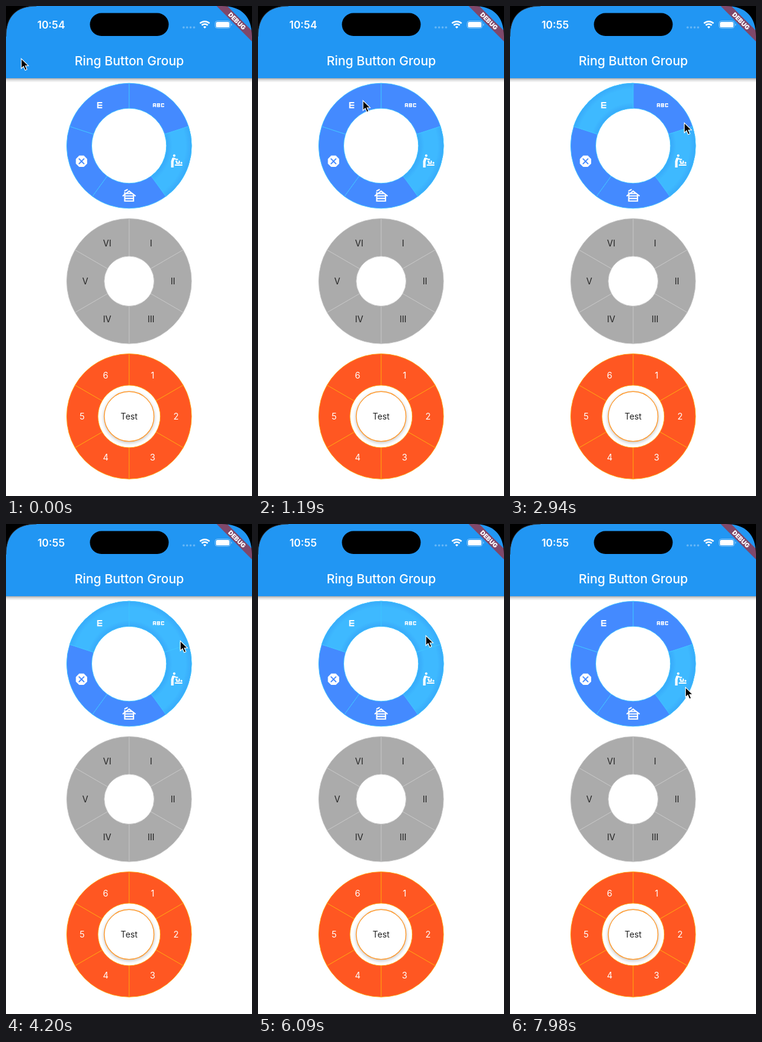
Animation, 403 px wide and 801 px high, one loop 8 s. Source, as an HTML page:

```html
<!DOCTYPE html>
<html lang="en">
<head>
<meta charset="utf-8">
<title>Ring Button Group</title>
<style>
  html, body { margin: 0; width: 100%; height: 100%; overflow: hidden; background: #fff; }
  svg { display: block; width: 403px; height: 801px; }
  text { font-family: Inter, Roboto, sans-serif; text-anchor: middle; }
</style>
</head>
<body>
<svg id="stage" viewBox="0 0 403 801">
  <defs>
    <linearGradient id="drop" x2="0" y2="1">
      <stop stop-color="#000" stop-opacity=".34"/>
      <stop offset=".4" stop-color="#000" stop-opacity=".14"/>
      <stop offset="1" stop-color="#000" stop-opacity="0"/>
    </linearGradient>
    <radialGradient id="lit" gradientUnits="userSpaceOnUse" cx="0" cy="0" r="102.5">
      <stop offset=".6" stop-color="#38aafa"/>
      <stop offset=".69" stop-color="#3eb9ff"/>
      <stop offset=".9" stop-color="#3eb9ff"/>
      <stop offset="1" stop-color="#38aafa"/>
    </radialGradient>
    <filter id="soft" x="-20%" y="-20%" width="140%" height="140%"><feGaussianBlur stdDeviation="2.5"/></filter>
  </defs>

  <rect width="403" height="801" fill="#fff"/>
  <rect y="118" width="403" height="7" fill="url(#drop)"/>
  <rect width="403" height="118" fill="#2196f3"/>
  <text x="202" y="97" font-size="20.5" font-weight="500" fill="#fff">Ring Button Group</text>

  <!-- status bar -->
  <text id="clock" x="74" y="36.6" font-size="17" font-weight="600" fill="#fff"></text>
  <rect x="137.5" y="11.5" width="129" height="37.5" rx="18.75"/>
  <g fill="#fff" fill-opacity=".32">
    <circle cx="291" cy="35" r="1.8"/><circle cx="296.7" cy="35" r="1.8"/>
    <circle cx="302.4" cy="35" r="1.8"/><circle cx="308.1" cy="35" r="1.8"/>
  </g>
  <g fill="none" stroke="#fff" stroke-width="2.5">
    <path d="M317.8 28.4a11 11 0 0 1 15.6 0M320.7 31.5a7 7 0 0 1 9.8 0"/>
    <path d="M325.6 36.8l-2.5-2.6a3.6 3.6 0 0 1 5 0z" fill="#fff" stroke="none"/>
  </g>
  <rect x="342.5" y="24.5" width="25" height="12" rx="4" fill="none" stroke="#fff" stroke-opacity=".45"/>
  <rect x="344" y="26" width="22" height="9" rx="2.6" fill="#fff"/>
  <path d="M369 28.5v4a2.2 2.2 0 0 0 0-4z" fill="#fff" fill-opacity=".5"/>

  <g transform="translate(403 0) rotate(45)">
    <rect x="-42" y="28.7" width="84" height="12.3" fill="#b71c1c" fill-opacity=".63"/>
    <text y="38.5" font-size="10.2" font-weight="900" fill="#fff">DEBUG</text>
  </g>
  <path d="M0 50C0 17 17 0 50 0H0zM403 50C403 17 386 0 353 0H403z"/>
  <path d="M0 50C0 17 17 0 50 0" fill="none" stroke="#333"/>

  <g id="rings"></g>

  <g transform="translate(201.7 670.9)">
    <circle cy="2" r="42" fill="#000" fill-opacity=".2" filter="url(#soft)"/>
    <circle r="40.7" fill="#fff" stroke="#ff9a2e" stroke-width="1.4"/>
    <text y="5" font-size="13.8" fill="#222">Test</text>
  </g>

  <path id="cursor" d="M0 0V16.2L3.7 12.8L6.4 19L9.3 17.7L6.7 11.7H11.8Z" fill="#000" stroke="#fff" stroke-width="1.1"/>
</svg>
<script>
const $ = id => document.getElementById(id);
const ICONS = [
  // letters
  'M21 11h-1.5v-.5h-2v3h2V13H21v1c0 .55-.45 1-1 1h-3c-.55 0-1-.45-1-1v-4c0-.55.45-1 1-1h3c.55 0 1 .45 1 1zM8 10v5H6.5v-1.5h-2V15H3v-5c0-.55.45-1 1-1h3c.55 0 1 .45 1 1zM6.5 10.5h-2V12h2zM13.5 12c.55 0 1 .45 1 1v1c0 .55-.45 1-1 1h-4V9h4c.55 0 1 .45 1 1v1c0 .55-.45 1-1 1zM11 10.5v.75h2v-.75zM13 12.75h-2v.75h2z',
  // changing table
  'M14 8v2h-3L8.31 8.82 7 12.75V22H3V12l1.58-4.63C4.96 6.25 6.22 5.7 7.3 6.18L11.45 8zM8 1a2 2 0 0 0 0 4a2 2 0 0 0 0-4zM9 19h12v-2H9zM19.5 16a1.5 1.5 0 0 0 0-3a1.5 1.5 0 0 0 0 3zM13 12c0-.55-.45-1-1-1h-2v2h1v3h5c.55 0 1-.45 1-1v-4h-2v3h-2z',
  // cabin
  'M10 1c0 1.66-1.34 3-3 3-.55 0-1 .45-1 1H4c0-1.66 1.34-3 3-3 .55 0 1-.45 1-1zM12 3L6 7.58V6H4v3.11L1 11.4l1.21 1.59L4 11.62V21h16v-9.38l1.79 1.36L23 11.4zM13.94 7h-3.89L12 5.52zM7.44 9h9.12L18 10.1v.9H6v-.9zM18 13v2H6v-2zM6 19v-2h12v2z',
  // crossed octagon
  'M15.73 3H8.27L3 8.27v7.46L8.27 21h7.46L21 15.73V8.27zM17 15.74L15.74 17 12 13.26 8.26 17 7 15.74 10.74 12 7 8.26 8.26 7 12 10.74 15.74 7 17 8.26 13.26 12z',
  // block E
  'M16 9V7H8v10h8v-2h-6v-2h6v-2h-6V9z'
];
const text = (size, fill) => label =>
  `<text y="${size * .36}" font-size="${size}" fill="${fill}">${label}</text>`;
const icon = d =>
  `<path transform="scale(1.025) translate(-12 -12)" d="${d}" fill="#fff" fill-rule="evenodd"/>`;

const polar = (r, a) => [r * Math.sin(a), -r * Math.cos(a)];

function ring(cy, inner, labelR, fill, line, items, draw, id) {
  const outer = 102.3, step = 2 * Math.PI / items.length;
  let slices = '', labels = '';
  items.forEach((item, i) => {
    const a = i * step, b = a + step;
    const d = `M${polar(outer, a)}A${outer} ${outer} 0 0 1 ${polar(outer, b)}` +
      `L${polar(inner, b)}A${inner} ${inner} 0 0 0 ${polar(inner, a)}Z`;
    slices += `<path d="${d}" fill="${fill}"/>`;
    if (id) slices += `<path id="${id + i}" d="${d}" fill="url(#lit)" opacity="0"/>`;
    labels += `<g transform="translate(${polar(labelR, a + step / 2)})">${draw(item)}</g>`;
  });
  return `<g transform="translate(201.7 ${cy})"><g stroke="${line}" stroke-width=".9">${slices}</g>${labels}</g>`;
}

$('rings').innerHTML =
  ring(228.5, 61.3, 82, '#448aff', '#40c4ff', ICONS, icon, 'lit') +
  ring(449.8, 40.8, 71.8, '#ababab', '#c6c6c6', ['I', 'II', 'III', 'IV', 'V', 'VI'], text(14, '#222')) +
  ring(670.9, 51, 76.9, '#ff5722', '#ffa30f', [1, 2, 3, 4, 5, 6], text(14.2, '#fff'));

// pointer legs: start, end, x, y
const LEGS = [
  [0, 0, 25, 86], [150, 1050, 172, 154.5], [1890, 2500, 285.5, 191],
  [5270, 5780, 275, 182.5], [6480, 6980, 168.5, 171.5], [7400, 7900, 287.5, 267]
];
// slice on/off times
const PRESSES = { lit0: [3150, 6350], lit1: [-1000, 9000], lit4: [1450, 7270] };

const clamp = v => Math.min(1, Math.max(0, v));
const ease = v => v * v * (3 - 2 * v);

function frame(now) {
  const t = now % 8000;
  let x = 0, y = 0;
  for (const [from, to, px, py] of LEGS) {
    const k = to ? ease(clamp((t - from) / (to - from))) : 1;
    x += (px - x) * k;
    y += (py - y) * k;
  }
  $('cursor').setAttribute('transform', `translate(${x} ${y})`);
  for (const id in PRESSES) {
    const [on, off] = PRESSES[id];
    $(id).setAttribute('opacity', clamp((t - on) / 140) - clamp((t - off) / 140));
  }
  $('clock').textContent = t < 1750 ? '10:54' : '10:55';
  requestAnimationFrame(frame);
}
requestAnimationFrame(frame);
</script>
</body>
</html>
```
